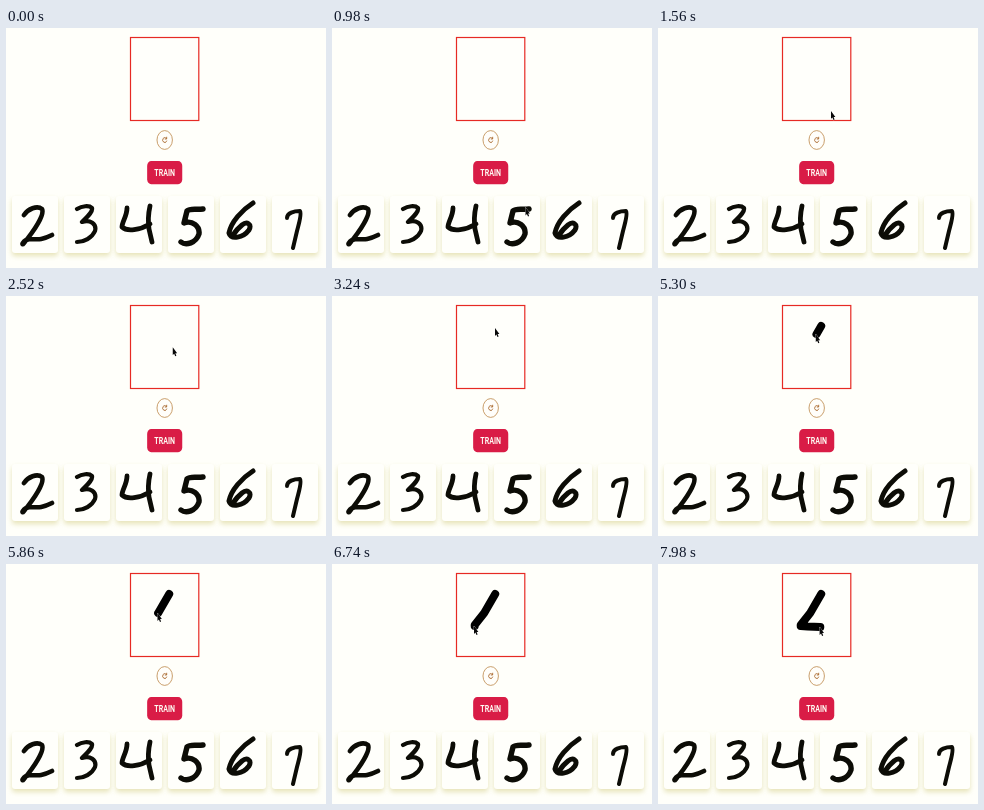
Animation, 320 px wide and 240 px high, one loop 8000 ms. Source, as an HTML page:

```html
<!DOCTYPE html>
<html lang="en">
<head>
<meta charset="utf-8">
<title>Digit trainer</title>
<style>
  html, body { margin: 0; width: 100%; height: 100%; overflow: hidden; background: #fffffa; }
  svg { display: block; width: 100vw; height: 100vh; }
  .line { fill: none; stroke-linecap: round; stroke-linejoin: round; }
  .card { fill: #fffffb; filter: drop-shadow(0 3px 2.6px #dcd89cb0); }
  .digit { stroke: #0c0c06; filter: blur(.75px); }
  text { font: 700 8.6px Roboto, "Open Sans", sans-serif; fill: #fffdf5; text-anchor: middle; }
</style>
</head>
<body>
<svg viewBox="0 0 320 240">
  <rect width="320" height="240" fill="#fffffa"/>
  <rect x="124.5" y="9.5" width="68.3" height="83" fill="#fffffb" stroke="#e62a24" stroke-width="1.2"/>

  <!-- The interface is shown slightly narrowed. -->
  <g transform="translate(158.7 0) scale(.82 1)">
    <ellipse cy="112" rx="9.4" ry="9.4" fill="#fffefa" stroke="#bd8a4c" stroke-width=".9"/>
    <path class="line" d="M2 110.4A2.5 2.5 0 1 0 2.4 113M2.4 109.2V111H.6" stroke="#a9692f"/>
    <rect x="-21.4" y="133" width="42.8" height="23.3" rx="5" fill="#d91c46"/>
    <text y="148.1">TRAIN</text>
  </g>

  <g id="cards"></g>
  <path id="ink" class="line" stroke="#000" stroke-width="8"/>
  <path id="cursor" d="M0 0V7.9L1.4 6.5L2.5 9.1L3.6 8.6L2.6 6H4.4Z" fill="#080808" stroke="#fff" stroke-width=".5" paint-order="stroke"/>
</svg>
<script>
const SVG_NS = "http://www.w3.org/2000/svg";
const LOOP = 8000, PEN_DOWN = 4300;

// Handwritten samples: path and pen width
const digits = [
  ["M18 187C22 181 31 177 36 181C39 187 27 204 18 215C15 219 16 212 24 211C31 211 34 213 46 207", 4.6],
  ["M71 181C76 178 83 177 86 180C87 184 81 189 76 194C84 191 91 196 89 203C86 210 78 214 71 214", 4.2],
  ["M121 180C121 188 116 194 116 199C121 204 134 202 144 196M144 178C142 187 142 194 143 201L146 214", 4.8],
  ["M197 181C190 182 184 180 181 183L178 195C186 192 194 198 193 206C190 215 180 218 175 214", 5.4],
  ["M247 175C236 182 225 194 223 205C225 212 237 210 243 202C246 196 241 193 236 197C231 201 229 204 227 207", 5],
  ["M281 190C281 185 288 183 294 183C296 186 293 195 291 203L287 220", 4]
];

// Pointer tip: time, x, y
const route = [
  [700, 206, 240], [1420, 174, 85], [1560, 173, 83], [3100, 163, 32],
  [3900, 163, 32], [PEN_DOWN, 162.5, 30], [4880, 162.5, 30],
  [5860, 151.5, 49], [6540, 142, 61], [6740, 142, 62],
  [7380, 149, 62.5], [LOOP, 162, 63]
];

function add(parent, tag, attributes) {
  const node = document.createElementNS(SVG_NS, tag);
  for (const name in attributes) node.setAttribute(name, attributes[name]);
  parent.append(node);
}

const cards = document.getElementById("cards");
digits.forEach(([d, width], i) => {
  add(cards, "rect", { class: "card", x: 6 + i * 52, y: 168, width: 46, height: 57, rx: 3 });
  add(cards, "path", { class: "line digit", d, "stroke-width": width });
});

function pointerAt(time) {
  const next = Math.max(1, route.findIndex(point => point[0] > time));
  const [t0, x0, y0] = route[next - 1], [t1, x1, y1] = route[next];
  const k = (time - t0) / (t1 - t0);
  return [x0 + (x1 - x0) * k, y0 + (y1 - y0) * k];
}

const ink = document.getElementById("ink");
const cursor = document.getElementById("cursor");

function draw(now) {
  const time = now % LOOP;
  const [x, y] = pointerAt(time);
  cursor.style.display = time < route[0][0] ? "none" : "";
  cursor.setAttribute("transform", `translate(${x} ${y})`);
  const points = route.filter(([t]) => t >= PEN_DOWN && t <= time).map(([, px, py]) => [px, py]);
  if (points.length) points.push([x, y]);
  ink.setAttribute("d", points.length ? "M" + points.map(([px, py]) => `${px + .7} ${py}`).join("L") : "");
  requestAnimationFrame(draw);
}
requestAnimationFrame(draw);
</script>
</body>
</html>
```
